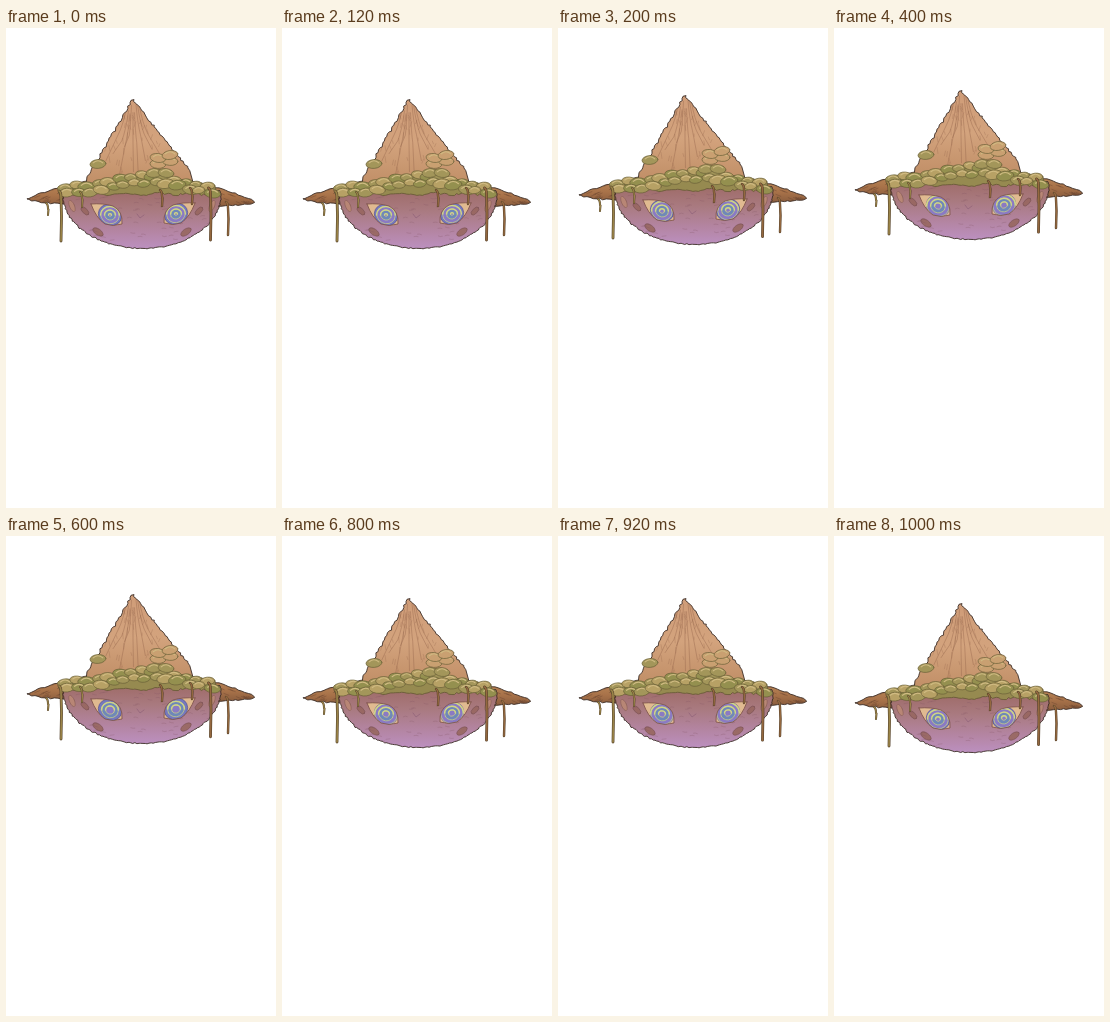
Write an HTML page with a canvas that moves like this. It is 270x480 px and loops after 1200 ms.

```html
<!DOCTYPE html>
<html lang="en">
<head>
<meta charset="utf-8">
<title>Floating hat</title>
<style>
html, body { margin: 0; width: 100%; height: 100%; overflow: hidden; background: #fff; }
canvas { display: block; width: 100vw; height: 100vh; }
</style>
</head>
<body>
<canvas id="stage"></canvas>
<script>
const W = 270, H = 480, LOOP = 1200, STEPS = 6;
const ctx = document.getElementById('stage').getContext('2d');
const INK = '#3a2c25';
let seed = 1;

function rand() {
  seed = (seed * 16807) % 2147483647;
  return seed / 2147483647;
}
const jitter = a => (rand() - 0.5) * a;
const range = (n, f) => Array.from({ length: n }, (_, i) => f(i));

// points of edge(t), t from 0 to 1, made ragged
const ragged = (n, amount, edge) =>
  range(n, i => edge(i / (n - 1)).map(v => v + jitter(amount)));

function shape(pts, fill, ink = INK) {
  const p = new Path2D();
  pts.forEach(([x, y]) => p.lineTo(x, y));
  p.closePath();
  ctx.fillStyle = fill;
  ctx.fill(p);
  line(p, ink, 0.9);
  return p;
}

function line(path, color, width) {
  ctx.strokeStyle = color;
  ctx.lineWidth = width;
  ctx.stroke(typeof path === 'string' ? new Path2D(path) : path);
}

function blob(x, y, rx, ry, fill, ink, angle = 0) {
  const p = new Path2D();
  p.ellipse(x, y, rx, ry, angle, 0, 7);
  ctx.fillStyle = fill;
  ctx.fill(p);
  if (ink) line(p, ink, 0.7);
}

function shade(y0, y1, ...colors) {
  const g = ctx.createLinearGradient(0, y0, 0, y1);
  colors.forEach((c, i) => g.addColorStop(i / (colors.length - 1), c));
  return g;
}

function within(path, draw) {
  ctx.save();
  ctx.clip(path);
  draw();
  ctx.restore();
}

function brim() {
  const arc = t => Math.abs(Math.sin(Math.PI * t));
  const top = ragged(70, 1.4, t => [22 + 227 * t, 171 + 3 * t - 24 * arc(t) ** 0.8]);
  const bottom = ragged(70, 1.4, t => [249 - 227 * t, 174 - 3 * t + 7 * arc(t) ** 0.5]);
  const p = shape([...top, ...bottom], shade(155, 181, '#bb8858', '#a87249', '#83583b'));
  within(p, () => {
    for (let i = 0; i < 40; i++) {
      const x = i % 2 ? 24 + rand() * 32 : 212 + rand() * 34;
      line(`M${x} ${162 + rand() * 16}l5 ${i % 2 ? -2 : 2}`, '#6b452f88', 0.8);
    }
  });
}

function face() {
  const bowl = ragged(120, 1.3, t => [
    136 - 79 * Math.cos(Math.PI * t), 167 + 53.5 * Math.sin(Math.PI * t)]);
  const p = shape([[58, 163], ...bowl, [214, 163]],
    shade(163, 221, '#9f6c69', '#a97a80', '#b384a0', '#bc90c0'));
  within(p, () => {
    for (const side of [-1, 1]) {
      blob(136 + side * 44, 204, 6, 3, '#9a6a66', '#7d5358', side * -0.6);
      blob(136 + side * 57, 183, 5, 2.5, '#996863', '#7d5358', side * -0.8);
      blob(136 + side * 70, 178, 2.5, 6, '#b88675', '#8b6059', side * 0.4);
    }
    for (let i = 0; i < 60; i++) {
      const x = 60 + rand() * 150, y = 168 + rand() * 50;
      line(`M${x} ${y}q2 ${jitter(3)} 4 ${jitter(2)}`, '#80546455', 0.8);
    }
    line('M131 186l3 4 4 -3', '#7c4e6d88', 0.8);
  });
}

function eye(x, y, side, pose) {
  ctx.save();
  ctx.translate(x, y);
  ctx.scale(side, 1);
  const lid = new Path2D('M-18 -11Q-6 -12 4 -9Q14 -4 13 9Q4 12 -4 9Q-13 3 -18 -11Z');
  ctx.fillStyle = '#e0ba90';
  ctx.fill(lid);
  within(lid, () => {
    blob(1, 0, 12, 10.5, '#7579bd', '#5c568f', 0.5);
    for (let k = 2; k >= 0; k--) {
      const r = (k * 4 + 1.5 + pose) % 12;
      blob(1, 0, r, r * 0.9, k % 2 ? '#6f88b8' : '#8a7ac4', '#d0d683', 0.5);
      line(`M${1 - r} 0A${r} ${r * 0.9} 0 0 1 ${1 + r} 0`, '#cfd585', 1.4);
    }
  });
  line(lid, '#80554f', 0.9);
  ctx.restore();
}

function cone() {
  const left = ragged(40, 2, t => [127 - 45 * t, 71 + 77 * t]);
  const right = ragged(40, 2, t => [184 - 57 * t, 71 + 71 * (1 - t) ** 0.95]);
  const p = shape([...left, [80, 158], [188, 158], ...right],
    shade(70, 158, '#cf9c78', '#d3a37d', '#c08e66'));
  within(p, () => {
    for (let i = 0; i < 9; i++) {
      const x = 127 + (i - 4) * 1.5, lean = (i - 4) * 4.5;
      line(`M${x} ${76 + rand() * 14}q${lean * 0.2} 20 ${lean * 0.5} 30l${lean * 0.6 + jitter(4)} ${8 + rand() * 24}`,
        '#94674c88', 0.8);
    }
    for (let i = 0; i < 45; i++) {
      const y = 82 + rand() * 65, x = 127 + jitter((y - 68) * 1.2);
      line(`M${x} ${y}l${jitter(4)} ${2 + rand() * 4}`, '#95664b66', 0.7);
    }
  });
}

// a rounded tuft with a pale upper rim
function tuft(x, y, r, fill) {
  blob(x, y, r, r * 0.55, fill, '#6a6038', jitter(0.4));
  line(`M${x - r * 0.6} ${y - r * 0.15}q${r * 0.6} ${-r * 0.5} ${r * 1.2} 0`, '#d0bb83', 1.1);
}

function moss() {
  const crest = x => 160 - 12 * Math.exp(-(((x - 142) / 48) ** 2));
  const top = ragged(60, 2, t => [53 + 156 * t, crest(53 + 156 * t) - 1]);
  const bottom = ragged(60, 2, t => [209 - 156 * t, 166 + Math.sin(t * 30)]);
  shape([...top, ...bottom], '#968a50', '#6a5c38');
  const greens = ['#a3965a', '#b7a165', '#94904f'];
  for (let row = 0; row < 2; row++) {
    for (let i = 0; i < 14; i++) {
      const x = 59 + i * 11 + row * 3 + jitter(4);
      tuft(x, crest(x) + row * 6 + jitter(3), 6 + rand() * 3, greens[(i + row) % 3]);
    }
  }
  for (const x of [92, 148, 160]) tuft(x, x < 100 ? 136 : 145, 8, greens[0]);
  for (let i = 0; i < 4; i++) {
    tuft(152 + i % 2 * 12, 136 - i * 3, 8, '#c9a071');
  }
}

function drip(x, top, bottom, width, color) {
  const d = `M${x - 2} ${top}Q${x} ${top + 1} ${x} ${top + 6}L${x + 0.5} ${(top + bottom) / 2}L${x} ${bottom - 1}`;
  line(d, '#54412b', width);
  line(d, color, width * 0.6);
}

function drips(pose) {
  const green = '#9a8448', brown = '#94683f';
  drip(42, 175, 188, 2, green);
  drip(55, 163, 214 + pose, 2.8, green);
  drip(76, 164, 180, 2, green);
  drip(156, 162, 179, 2.3, brown);
  drip(186, 160, 177, 2.3, brown);
  drip(204.5, 160, 213 + pose * 0.6, 2.8, brown);
  drip(222, 174, 208 + pose, 2.4, brown);
}

function draw(pose) {
  const dpr = devicePixelRatio || 1, { canvas } = ctx;
  canvas.width = innerWidth * dpr;
  canvas.height = innerHeight * dpr;
  ctx.scale(canvas.width / W, canvas.height / H);
  ctx.translate(0, -Math.round(13 * pose / 3));
  ctx.lineJoin = ctx.lineCap = 'round';
  seed = 4711;
  brim();
  face();
  eye(103, 187, 1, pose);
  eye(171, 186, -1, pose);
  cone();
  moss();
  drips(pose);
}

let shown = '';
function tick() {
  const step = Math.floor(performance.now() % LOOP / (LOOP / STEPS));
  const pose = Math.min(step, STEPS - step);
  const key = [pose, innerWidth, innerHeight].join();
  if (key !== shown) draw(pose);
  shown = key;
  requestAnimationFrame(tick);
}
tick();
</script>
</body>
</html>
```
